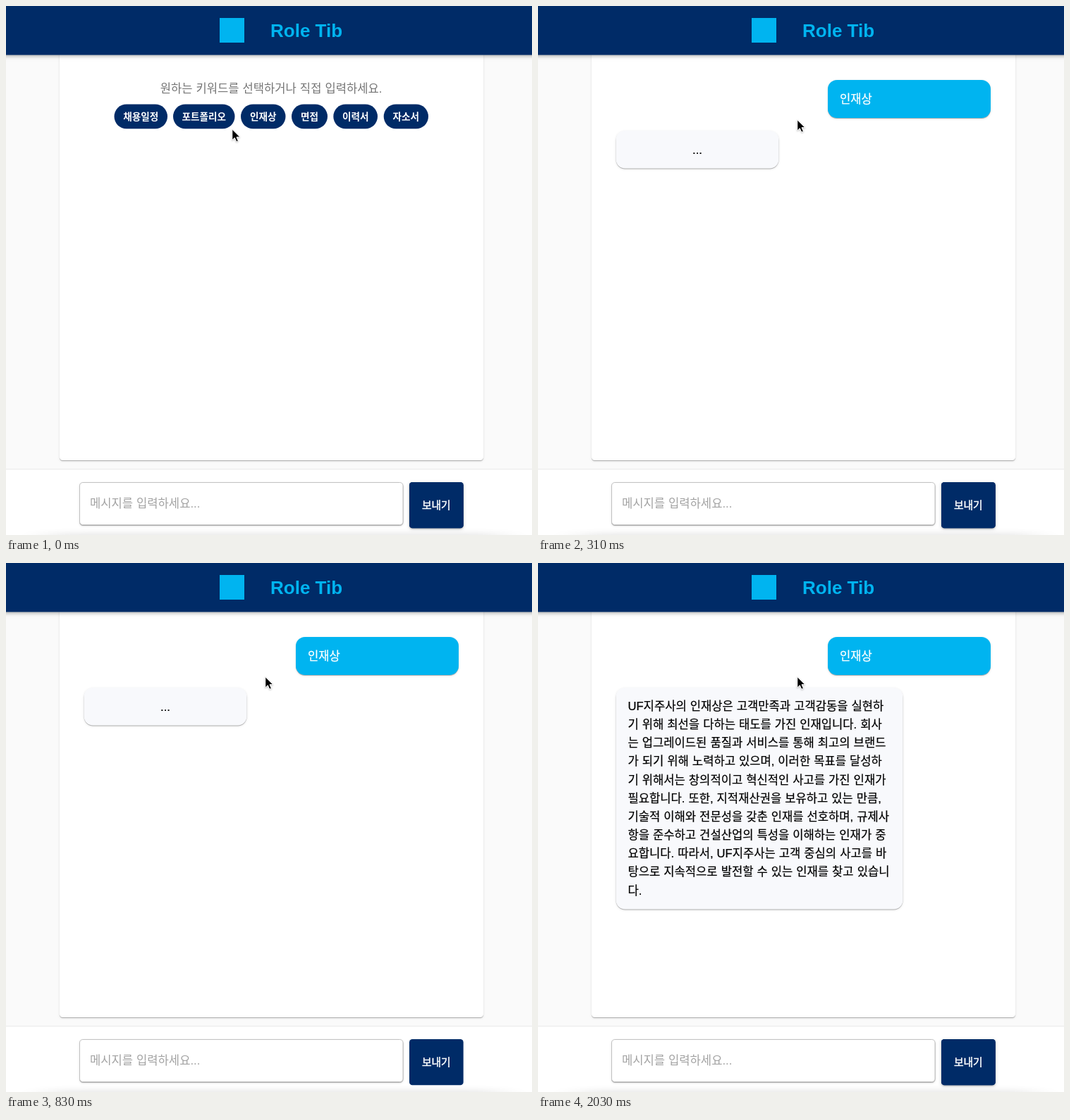
These frames come from a looping animation (746x751 px, 2.69 s). An HTML page:

```html
<!DOCTYPE html>
<html lang="ko">
<head>
<meta charset="utf-8">
<title>Chat</title>
<style>
  html, body { margin: 0; width: 100%; height: 100%; overflow: hidden; background: #fafafa; }
  svg { display: block; width: 746px; height: 751px; }
  text { font: 400 16.6px "Liberation Sans", "Noto Sans CJK KR", "Noto Sans CJK", sans-serif; word-spacing: .4px; }
  .mid { text-anchor: middle; }
  .brand { font-size: 26px; font-weight: 700; word-spacing: 0; }
  .chip text { font-size: 13.6px; font-weight: 700; fill: #fff; }
  .send { font-size: 14.8px; fill: #fff; stroke: #fff; stroke-width: .5px; }
  .said { fill: #fff; stroke: #fff; stroke-width: .25px; }
  #answer, #dots { stroke: #000; stroke-width: .22px; }
  .bar { filter: drop-shadow(0 1px 2px rgba(0,0,0,.2)) drop-shadow(0 3px 2.5px rgba(0,0,0,.13)); }
  .paper { filter: drop-shadow(0 1px .5px rgba(0,0,0,.24)) drop-shadow(0 1px 1.5px rgba(0,0,0,.12)); }
  .lift { filter: drop-shadow(0 1.5px 1px rgba(0,0,0,.26)) drop-shadow(0 1px 2.5px rgba(0,0,0,.14)); }
  .arrow { filter: drop-shadow(0 1px 1px rgba(0,0,0,.25)); }
</style>
</head>
<body>
<svg viewBox="0 0 746 751" xmlns="http://www.w3.org/2000/svg">
  <defs>
    <filter id="soft" x="-20%" y="-200%" width="140%" height="500%"><feGaussianBlur stdDeviation="26 5"/></filter>
  </defs>
  <rect width="746" height="751" fill="#fafafa"/>
  <rect class="paper" x="76" y="40" width="601" height="605" rx="4.4" fill="#fff"/>
  <g class="bar"><rect x="-12" y="-12" width="770" height="81.5" fill="#002b67"/></g>
  <rect x="303" y="17" width="35" height="35" fill="#00b4f0"/>
  <text class="brand" x="375" y="44" fill="#00b4f0">Role Tib</text>

  <g id="menu">
    <text class="mid" x="376" y="123" fill="#757575">원하는 키워드를 선택하거나 직접 입력하세요.</text>
    <g id="chips"></g>
  </g>

  <g id="chat">
    <rect class="paper" x="411" y="105" width="231" height="54" rx="13" fill="#00b4f0"/>
    <text class="said" x="428" y="137.5">인재상</text>
    <rect id="bubble" class="paper" x="110.5" y="177" rx="13" fill="#f8f9fc"/>
    <text id="dots" class="mid" x="226" y="209.5">...</text>
    <g id="answer"></g>
  </g>

  <rect y="657" width="746" height="94" fill="#fff"/>
  <rect y="657" width="746" height="1" fill="#e9e9e9"/>
  <rect x="60" y="749" width="640" height="16" fill="#000" opacity=".1" filter="url(#soft)"/>
  <rect class="paper" x="104.5" y="676.5" width="458.5" height="60" rx="4.4" fill="#fff" stroke="#c2c2c2"/>
  <text x="119" y="712" fill="#a2a2a2">메시지를 입력하세요...</text>
  <rect id="glow" class="lift" x="572" y="676" width="76.7" height="65.3" rx="4.4" fill="#002b67"/>
  <rect x="572" y="676" width="76.7" height="65.3" rx="4.4" fill="#002b67"/>
  <text class="send mid" x="610.3" y="713.5">보내기</text>

  <g id="cursor">
    <path id="arrow" class="arrow" d="M.8 .6V15.9L4.3 12.6 6.8 18.2 9.4 17.1 7 11.6H11.8Z" fill="#000" stroke="#fff" stroke-width="1"/>
    <g id="hand" fill="#fff" stroke="#000" stroke-width="1.1" stroke-linejoin="round" stroke-linecap="round">
      <path d="M-.5 3.2C-.9 1.4 1.7.8 2.3 2.6L3.9 8C4.5 6.6 6.4 6.8 6.7 8.1 7.4 7.1 9 7.5 9.2 8.7 10.2 8 11.6 8.7 11.5 10.2 11.7 13.2 11.2 14.7 10 16.6L9.8 19.4H2.6L2.3 17.6C.4 15.8-1.4 13.4-3.3 11.4-4.5 9.9-2.8 8.4-1.2 9.6L1 11.2Z"/>
      <path d="M3.9 13.2 4.3 16.3M6.3 13.2 6.4 16.3M8.7 13.2 8.5 16.3" fill="none" stroke-width=".9"/>
    </g>
  </g>
</svg>
<script>
const LOOP = 2690, ASK = 310, REPLY = 1970;
const $ = id => document.getElementById(id);
const ramp = (t, a, b) => Math.min(1, Math.max(0, (t - a) / (b - a)));
const show = (id, on) => $(id).setAttribute('display', on ? 'inline' : 'none');

function add(parent, tag, attrs, text) {
  const el = document.createElementNS('http://www.w3.org/2000/svg', tag);
  for (const k in attrs) el.setAttribute(k, attrs[k]);
  if (text) el.textContent = text;
  return parent.appendChild(el);
}

const chips = [
  ['채용일정', 153.5, 75.5], ['포트폴리오', 237, 87.5], ['인재상', 333, 63.5],
  ['면접', 405, 51], ['이력서', 464.3, 62.7], ['자소서', 535.7, 63.3]
];
for (const [label, x, width] of chips) {
  const g = add($('chips'), 'g', { class: 'chip' });
  add(g, 'rect', { x, y: 139.5, width, height: 34.8, rx: 17.4, fill: '#002b67' });
  add(g, 'text', { class: 'mid', x: x + width / 2, y: 161.5 }, label);
}

const lines = [
  'UF지주사의 인재상은 고객만족과 고객감동을 실현하',
  '기 위해 최선을 다하는 태도를 가진 인재입니다. 회사',
  '는 업그레이드된 품질과 서비스를 통해 최고의 브랜드',
  '가 되기 위해 노력하고 있으며, 이러한 목표를 달성하',
  '기 위해서는 창의적이고 혁신적인 사고를 가진 인재가',
  '필요합니다. 또한, 지적재산권을 보유하고 있는 만큼,',
  '기술적 이해와 전문성을 갖춘 인재를 선호하며, 규제사',
  '항을 준수하고 건설산업의 특성을 이해하는 인재가 중',
  '요합니다. 따라서, UF지주사는 고객 중심의 사고를 바',
  '탕으로 지속적으로 발전할 수 있는 인재를 찾고 있습니',
  '다.'
];
lines.forEach((line, i) => add($('answer'), 'text', { x: 127.5, y: 209 + i * 26.15 }, line));

function draw(t) {
  const asked = t >= ASK, replied = t >= REPLY;
  show('menu', !asked);
  show('chat', asked);
  show('dots', !replied);
  show('answer', replied);
  $('bubble').setAttribute('width', replied ? 407 : 231);
  $('bubble').setAttribute('height', replied ? 314.5 : 53.5);

  // the send button is flat while the reply is pending
  $('glow').setAttribute('opacity', 1 - ramp(t, ASK, 490) + ramp(t, REPLY, 2030));

  const p = 1 - (1 - ramp(t, 20, 230)) ** 2;
  const x = 320 + 47 * p, y = 174.5 - 13.5 * p;
  const over = !asked && x > 335 && y < 174;
  $('cursor').setAttribute('transform', `translate(${x} ${y})`);
  show('hand', over);
  show('arrow', !over);
}

let start;
function tick(now) {
  start ??= now;
  draw((now - start) % LOOP);
  requestAnimationFrame(tick);
}
draw(0);
requestAnimationFrame(tick);
</script>
</body>
</html>
```
